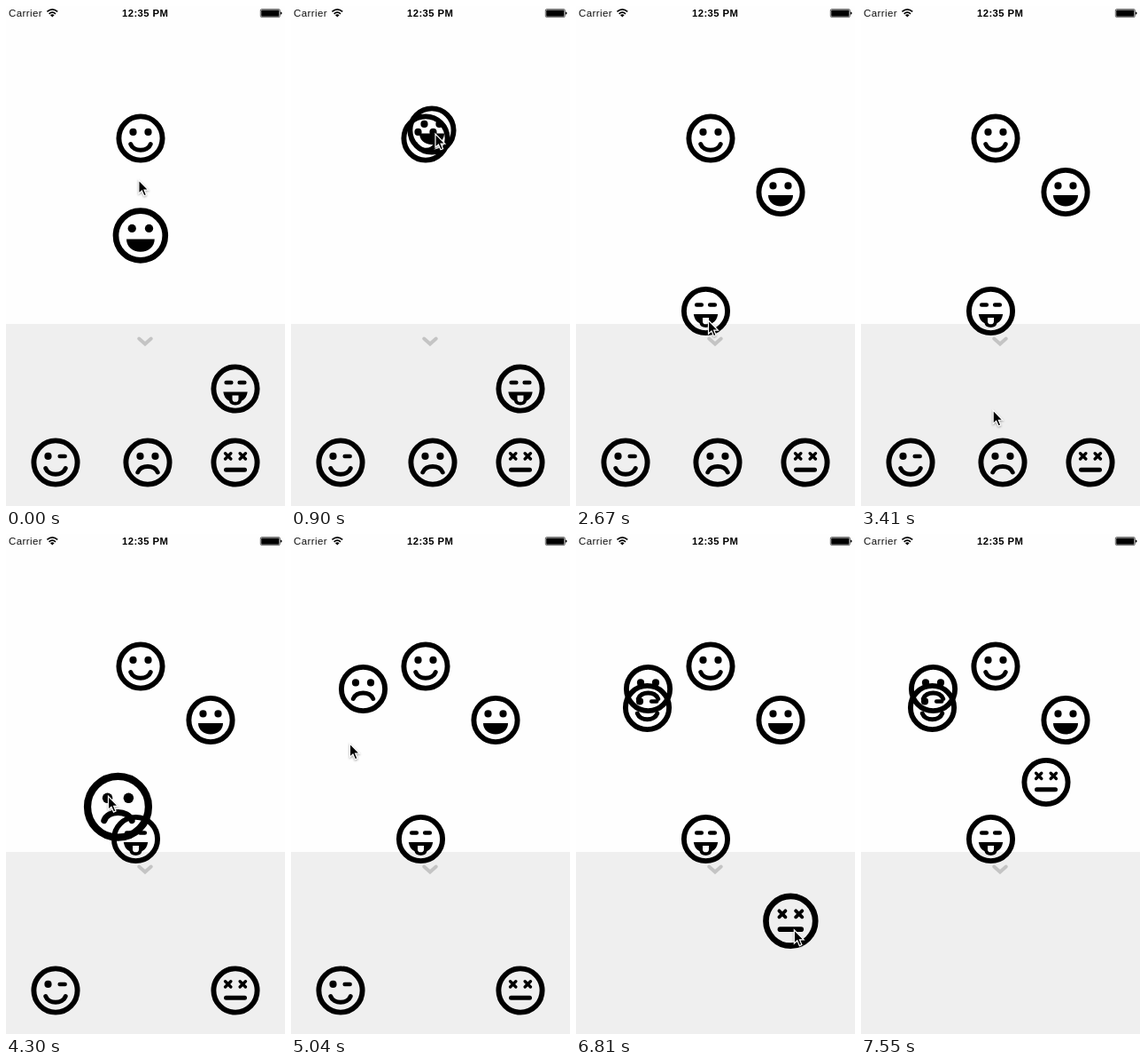
Write an HTML page that moves like this. It is 315 by 563 pixels and loops after 8.17 s.

```html
<!DOCTYPE html>
<html lang="en">
<head>
<meta charset="utf-8">
<title>Drag the faces</title>
<style>
  html, body { margin: 0; width: 100%; height: 100%; overflow: hidden; background: #fefefe; }
  svg { display: block; width: 100%; height: 100%; }
  text { font-family: "Liberation Sans", Arial, sans-serif; }
  .line { fill: none; stroke: #000; stroke-width: 5; stroke-linecap: round; stroke-linejoin: round; }
  .thin { stroke-width: 4.6; }
  .cross { stroke-width: 3.4; }
</style>
</head>
<body>
<svg viewBox="0 0 315 563">
  <rect width="315" height="563" fill="#fefefe"/>
  <rect y="358" width="315" height="205" fill="#efefef"/>

  <text x="3" y="12.3" font-size="11.5" letter-spacing=".4" fill="#111">Carrier</text>
  <g fill="none" stroke="#000" stroke-width="1.7">
    <path d="M46.4 6.4Q52.3 1.2 58.2 6.4M48.6 8.8Q52.3 5.6 56 8.8"/>
    <path d="M50 10.2Q52.3 8.4 54.6 10.2L52.3 12.6Z" fill="#000" stroke="none"/>
  </g>
  <text x="157.2" y="12.3" font-size="11.3" font-weight="bold" letter-spacing=".4" text-anchor="middle">12:35 PM</text>
  <rect x="287.3" y="3.6" width="22" height="9" rx="1.4" fill="none" stroke="#000" stroke-width=".6"/>
  <rect x="288.2" y="4.5" width="20.2" height="7.2" rx=".6"/>
  <path d="M310 6.4Q311.6 6.8 311.6 8.1T310 9.8Z"/>

  <path d="M150.2 374.6L157 380.6L163.8 374.6" fill="none" stroke="#c4c4c4" stroke-width="4" stroke-linecap="round"/>
  <g id="faces"></g>
  <path id="cursor" d="M0 0V15.2L3.5 12L6 17.8L8.6 16.7L6.2 11.1H10.9Z" stroke="#fff" stroke-width="1.2"
        style="filter: drop-shadow(0 1px 1px rgba(0,0,0,.35))"/>
</svg>
<script>
const STEP = 148, LOOP = 8170, LAST_STEP = 51;
const RADIUS = 27.5, LIFT = 11;
const REST = 2; // steps the cursor waits after a drop

const line = (d, extra = '') => `<path class="line ${extra}" d="${d}"/>`;
const eye = x => `<circle cx="${x}" cy="-7.1" r="4.1"/>`;
const cross = x => line(`M${x - 3.1} -10.2l6.2 6.2m0 -6.2l-6.2 6.2`, 'cross');
const eyes = eye(-8.5) + eye(8.5);
const grin = line('M-11.2 6.6C-8 15.4 8 15.4 11.2 6.6');

const looks = {
  smile: eyes + grin,
  laugh: eyes + '<path d="M-14 3.5H14C14 11 8 16 0 16S-14 11 -14 3.5Z"/>',
  tongue: line('M-10.3 -7H-4.7M4.7 -7H10.3', 'thin') +
    '<path fill-rule="evenodd" d="M-13.7 3.5H13.7C13 8.4 11 11.6 7 13.8C6.4 16.8 4 18.4 0 18.4S-6.4 16.8 -7 13.8C-11 11.6 -13 8.4 -13.7 3.5ZM-3.5 7.6V11.4Q-3.5 14.8 0 14.8T3.5 11.4V7.6Z"/>',
  sad: eyes + line('M-11.2 11C-8 2.2 8 2.2 11.2 11'),
  wink: eye(-8.5) + line('M4.7 -7H10.6', 'thin') + grin,
  dizzy: cross(-8.3) + cross(8.3) + line('M-10.5 8.2H10.5')
};

const middle = (a, b) => a.map((v, i) => (v + b[i]) / 2);
const drag = (look, grab, drop, from, to, grip, via = middle(from, to)) =>
  ({ look, grab, drop, from, to, grip, via });

// In order of time; grip is the cursor's place relative to the face.
const drags = [
  drag('laugh', -1, 3, [149.5, 298], [159, 140], [-2, -62.5]),
  drag('laugh', 6, 9, [159, 140], [231, 209.5], [4, 4]),
  drag('tongue', 13, 16, [259, 431], [146.5, 343.5], [3, 10.5]),
  drag('sad', 26, 31, [160, 514], [81.5, 174.5], [-11, -12], [149, 338]),
  drag('wink', 36.4, 40, [56, 514], [80.5, 195.5], [-5, 1], [108, 127]),
  drag('dizzy', 45, 48, [259, 514], [209, 279.5], [4, 10])
];

const clamp = v => Math.max(0, Math.min(1, v));
const smooth = k => k * k * (3 - 2 * k);
const add = (a, b) => a.map((v, i) => v + b[i]);
const mix = (a, b, k) => a.map((v, i) => v + (b[i] - v) * k);

function dragPoint(d, step) {
  const k = clamp((step - d.grab) / (d.drop - d.grab));
  return mix(mix(d.from, d.via, k), mix(d.via, d.to, k), k);
}

// A held face swells over three steps and settles over two once dropped.
function dragScale(d, step) {
  const lift = Math.min(clamp((step - d.grab) / 3), clamp(1 - (step - d.drop) / 2));
  return 1 + LIFT / RADIUS * lift;
}

// The cursor rides a held face, rests, then glides to the next one.
function cursorPoint(step) {
  const i = drags.findLastIndex(d => d.grab <= step);
  const here = drags[i], next = drags[i + 1];
  const held = add(dragPoint(here, step), here.grip);
  if (!next) return held;
  const leave = here.drop + REST;
  const k = smooth(clamp((step - leave) / (next.grab - leave)));
  return mix(held, add(next.from, next.grip), k);
}

const layer = document.getElementById('faces');
const cursor = document.getElementById('cursor');

const faces = Object.keys(looks).map(look => {
  const node = document.createElementNS('http://www.w3.org/2000/svg', 'g');
  node.innerHTML = `<circle r="24.6" fill="none" stroke="#000" stroke-width="5.9"/>${looks[look]}`;
  node.setAttribute('transform', 'translate(152 149)');
  layer.append(node);
  return { node, drags: drags.filter(d => d.look === look) };
});

function draw(time) {
  const step = Math.min(LAST_STEP, Math.floor(time % LOOP / STEP));
  for (const face of faces) {
    const d = face.drags.findLast(d => d.grab <= step) || face.drags[0];
    if (!d) continue;
    const [x, y] = dragPoint(d, step);
    face.node.setAttribute('transform', `translate(${x} ${y}) scale(${dragScale(d, step)})`);
  }
  const [x, y] = cursorPoint(step);
  cursor.setAttribute('transform', `translate(${x} ${y})`);
  cursor.setAttribute('visibility', step < LAST_STEP ? 'visible' : 'hidden');
}

const start = performance.now();
function tick() {
  draw(performance.now() - start);
  requestAnimationFrame(tick);
}
tick();
</script>
</body>
</html>
```
